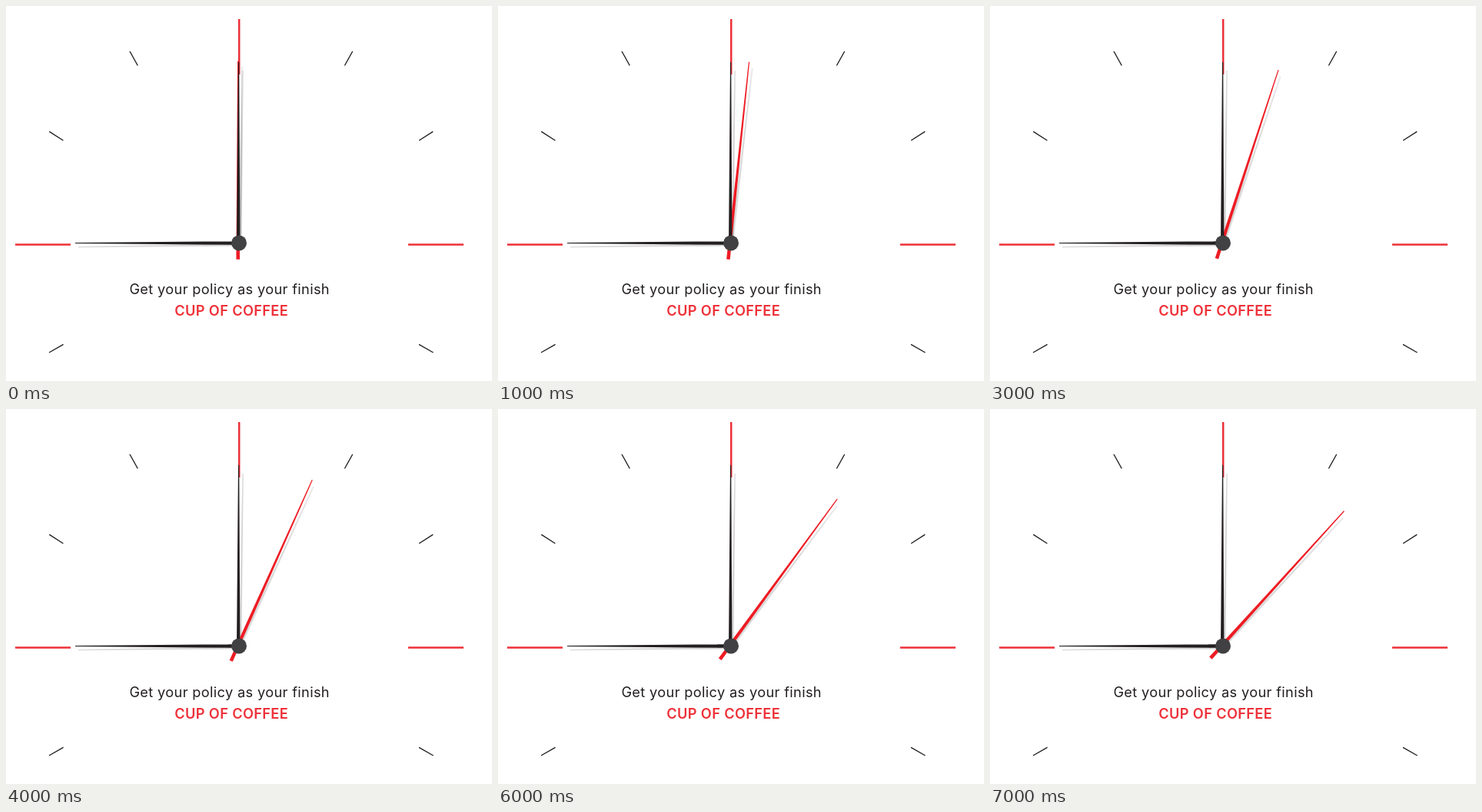
Write an HTML page that moves like this. It is 632 px wide and 488 px high and loops after 8 s.

```html
<!DOCTYPE html>
<html lang="en">
<head>
<meta charset="utf-8">
<title>Clock</title>
<style>
  html, body { margin: 0; width: 100%; height: 100%; overflow: hidden; background: #fff; }
  svg { display: block; }
  text { font: 18.2px Inter, sans-serif; text-anchor: middle; letter-spacing: .35px; fill: #231f20; }
  .accent { font-weight: 600; fill: #ee3038; }
  .shadow { fill: #000; opacity: .15; filter: url(#soft); }
</style>
</head>
<body>
<svg width="632" height="488" viewBox="0 0 632 488">
  <filter id="soft" filterUnits="userSpaceOnUse" x="-400" y="-400" width="1100" height="900">
    <feGaussianBlur stdDeviation=".5"/>
  </filter>

  <path d="M303.2 17V89M12 310.4H84M523 310.4H595" stroke="#ee3038" stroke-width="2.5"/>
  <path d="M161 59L171.3 77.5M450.7 59L440.4 77.5M56.3 163.3L74.4 175M555.3 163.3L537.2 175M56 451L74.6 440.3M555.6 451L537 440.3"
        stroke="#231f20" stroke-width="1.4"/>

  <path class="shadow" d="M307.5 84H308.8L306.5 306H303Z"/>
  <path class="shadow" d="M94 313V314.2L300 312.5V309Z"/>

  <g id="second">
    <path class="shadow" d="M4.5-229H5.6L4.2 10H.5Z"/>
    <path d="M-.6-236.3H.6L2.3 22H-2.3Z" fill="#ed1c24"/>
  </g>

  <path d="M302 73H303.2L304.4 308H300Z M90 308V309L303 310.8V306.2Z" fill="#231f20"/>
  <circle cx="303" cy="308.4" r="10" fill="#414042"/>

  <text x="290.7" y="375">Get your policy as your finish</text>
  <text class="accent" x="293.2" y="403">CUP OF COFFEE</text>
</svg>
<script>
  const second = document.getElementById('second');

  function draw(now) {
    const angle = Math.floor(now / 1000) % 8 * 6.03;
    second.setAttribute('transform', `translate(301.7 307.8) rotate(${angle})`);
    requestAnimationFrame(draw);
  }
  draw(performance.now());
</script>
</body>
</html>
```
